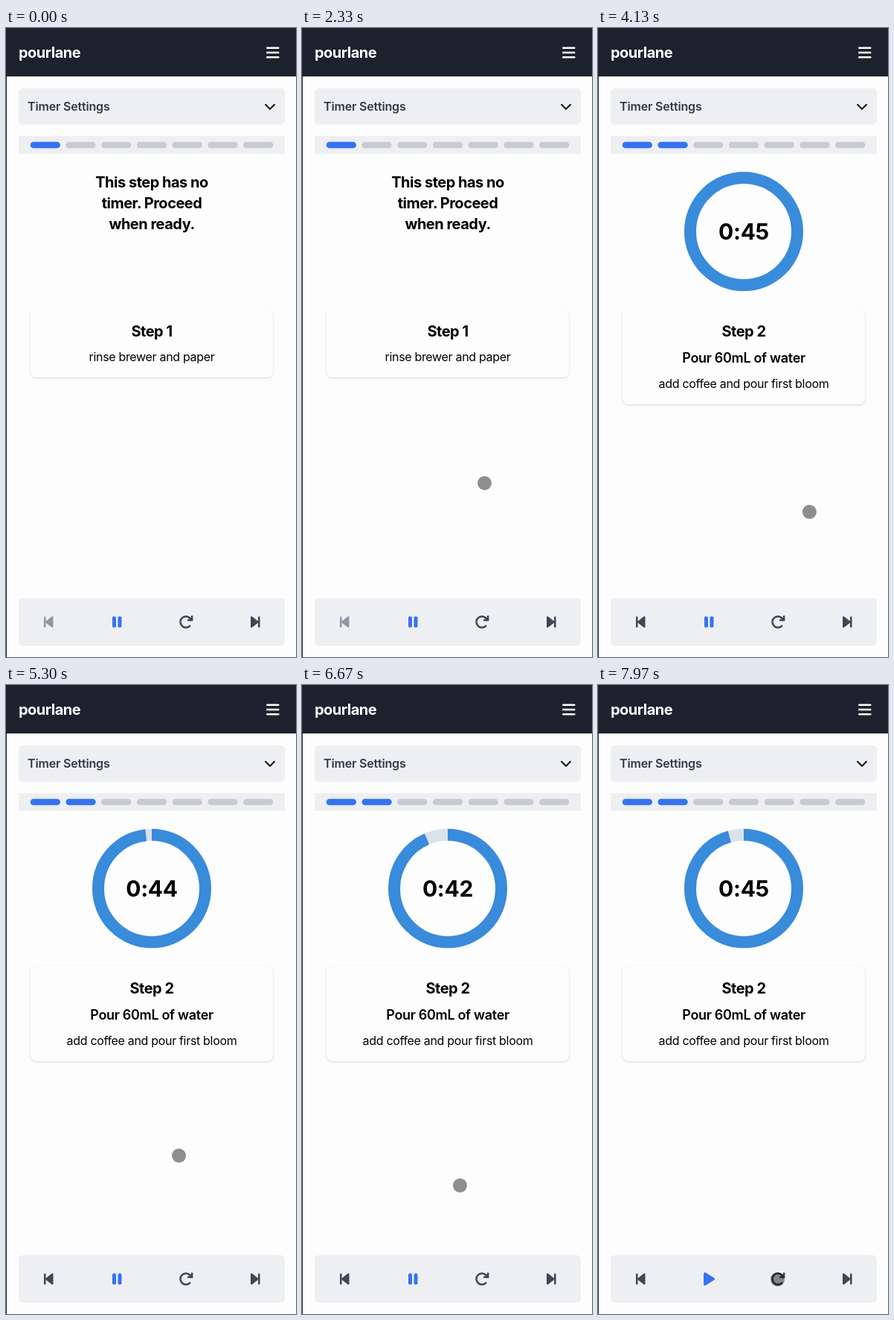
Recreate the animation shown at these times as an HTML page with a canvas. Size 390 by 844 pixels, loop 8000 ms.

```html
<!DOCTYPE html>
<html lang="en">
<head>
<meta charset="utf-8">
<title>Brew timer</title>
<style>
  html, body { margin: 0; width: 100%; height: 100%; overflow: hidden; background: #fdfdfd; }
  body { position: relative; font: 16px/24px Inter, "Open Sans", sans-serif; letter-spacing: -0.02em; color: #000; }
  canvas { position: absolute; left: 0; top: 0; width: 390px; height: 844px; }
  div { position: absolute; left: 33px; width: 326px; text-align: center; white-space: pre; }
  #brand, #settings { text-align: left; }
  #brand, #notice, #step { font: 700 20px/28px Inter, sans-serif; letter-spacing: -0.025em; }
  #brand { left: 17px; top: 19px; color: #fff; }
  #settings { left: 29px; top: 93px; font-weight: 600; letter-spacing: -0.01em; color: #333a46; }
  #notice { top: 193px; }
  #clock { top: 255px; font: 700 30px/36px Inter, sans-serif; }
  #step { top: 393px; }
  #pour { top: 429px; font: 600 18px/28px Inter, sans-serif; }
</style>
</head>
<body>
<canvas id="stage"></canvas>
<div id="brand">pourlane</div>
<div id="settings">Timer Settings</div>
<div id="notice">This step has no
timer. Proceed
when ready.</div>
<div id="clock"></div>
<div id="step"></div>
<div id="pour">Pour 60mL of water</div>
<div id="note"></div>
<script>
const LOOP = 8000, ENTER_AT = 1800, NEXT_AT = 3500, PAUSE_AT = 7020, RESET_AT = 7880;
const TOTAL = 45, FIRST_TICK = 5110, TICK = 2000 / 3, GLIDE = 400;
const PANEL = '#eeeff3', BLUE = '#3574f0', DARK = '#3f4654', MUTED = '#9197a1';
const ICON_Y = 797;

// Pointer stops: [time, x, y]
const STOPS = [
  [ENTER_AT, 374, 645], [2170, 260, 594], [2330, 245, 610], [3070, 337, 780],
  [NEXT_AT, 336, 794], [4130, 284, 649], [4270, 243, 620], [5300, 232, 631],
  [6670, 212, 671], [PAUSE_AT, 143, 801], [RESET_AT, 241, 797]
];

const $ = id => document.getElementById(id);
const canvas = $('stage'), ctx = canvas.getContext('2d');
const scale = window.devicePixelRatio || 1;
canvas.width = 390 * scale;
canvas.height = 844 * scale;

// CSS "ease": cubic-bezier(.25, .1, .25, 1)
function ease(x) {
  if (x <= 0) return 0;
  if (x >= 1) return 1;
  const bez = (a, b, u) => 3 * a * u * (1 - u) ** 2 + 3 * b * u * u * (1 - u) + u ** 3;
  let lo = 0, hi = 1;
  for (let i = 0; i < 20; i++) {
    const mid = (lo + hi) / 2;
    if (bez(0.25, 0.25, mid) < x) lo = mid; else hi = mid;
  }
  return bez(0.1, 1, lo);
}

// Shown seconds and the ring value that glides after them
function countdown(t) {
  const lastTick = Math.floor((PAUSE_AT - FIRST_TICK) / TICK) + 1;
  if (t >= RESET_AT) {
    return { shown: TOTAL, left: TOTAL - lastTick * (1 - ease((t - RESET_AT) / GLIDE)) };
  }
  const n = Math.min(lastTick, Math.max(0, Math.floor((t - FIRST_TICK) / TICK) + 1));
  const since = t - FIRST_TICK - (n - 1) * TICK;
  return { shown: TOTAL - n, left: n ? TOTAL - n + 1 - ease(since / GLIDE) : TOTAL };
}

function slope(i, k) {
  if (i <= 0 || i >= STOPS.length - 1) return 0;
  const rate = j => (STOPS[j + 1][k] - STOPS[j][k]) / (STOPS[j + 1][0] - STOPS[j][0]);
  const a = rate(i - 1), b = rate(i);
  return a * b > 0 ? 2 * a * b / (a + b) : 0;
}

// Monotone Hermite curve through the stops
function pointer(t) {
  let i = 0;
  while (i < STOPS.length - 2 && t >= STOPS[i + 1][0]) i++;
  const p = STOPS[i], q = STOPS[i + 1], h = q[0] - p[0], u = Math.min(1, (t - p[0]) / h);
  return [1, 2].map(k =>
    p[k] + (q[k] - p[k]) * u * u * (3 - 2 * u) +
    h * u * (1 - u) * (slope(i, k) * (1 - u) - slope(i + 1, k) * u));
}

function box(x, y, w, h, r, color) {
  ctx.fillStyle = color;
  ctx.beginPath();
  ctx.roundRect(x, y, w, h, r);
  ctx.fill();
}

function shadowBox(x, y, w, h, r, color, blur, alpha) {
  ctx.save();
  ctx.shadowColor = `rgba(0,0,0,${alpha})`;
  ctx.shadowBlur = blur * scale;
  ctx.shadowOffsetY = scale;
  box(x, y, w, h, r, color);
  ctx.restore();
}

function line(points, width, color) {
  ctx.strokeStyle = color;
  ctx.lineWidth = width;
  ctx.lineCap = ctx.lineJoin = 'round';
  ctx.beginPath();
  points.forEach(p => ctx.lineTo(...p));
  ctx.stroke();
}

// Filled triangle with rounded corners: base at x, tip at tipX
function triangle(x, tipX, half, soft, color) {
  const a = [x, ICON_Y - half], b = [x, ICON_Y + half], tip = [tipX, ICON_Y];
  line([a, b, tip, a, b], soft, color);
  ctx.fillStyle = color;
  ctx.fill();
}

function arc(x, y, r, from, to, width, color) {
  ctx.strokeStyle = color;
  ctx.lineWidth = width;
  ctx.beginPath();
  ctx.arc(x, y, r, from, to);
  ctx.stroke();
}

// Skip icon around x; dir is 1 for next, -1 for previous
function skip(x, dir, color) {
  const bar = x + dir * 5;
  triangle(x - dir * 5, x + dir * 3, 6.2, 2.5, color);
  line([[bar, ICON_Y - 6.25], [bar, ICON_Y + 6.25]], 2.5, color);
}

function reload(x, y) {
  const r = 7.5, d = r * Math.SQRT1_2;
  ctx.lineCap = 'round';
  arc(x, y, r, Math.PI / 4, Math.PI * 7 / 4, 2.5, DARK);
  line([[x + d, y - d], [x + 8.1, y - 2.5]], 2.5, DARK);
  line([[x + 3.1, y - 2.5], [x + 8.1, y - 2.5], [x + 8.1, y - 7.5]], 2.5, DARK);
}

function header() {
  box(0, 0, 390, 65, 0, '#1c232e');
  box(0, 65, 1, 779, 0, '#1c232e');
  for (let i = -1; i <= 1; i++) {
    const y = 33 + i * 6.25;
    line([[351.25, y], [366.25, y]], 2.5, '#fff');
  }
}

function settings() {
  shadowBox(17, 81, 358, 48, 6, PANEL, 2, 0.05);
  line([[349, 102.7], [355, 108.7], [361, 102.7]], 2, '#111');
}

function progress(done) {
  const count = 7, gap = 8, w = (326 + gap) / count - gap;
  box(17, 145, 358, 24, 0, PANEL);
  for (let i = 0; i < count; i++) {
    box(32.7 + i * (w + gap), 152.7, w + 0.6, 8.6, 4.3, i < done ? BLUE : '#c9cbd2');
  }
}

function ring(part) {
  const top = -Math.PI / 2, turn = Math.PI * 2;
  ctx.lineCap = 'butt';
  arc(196, 273, 72, 0, turn, 16, '#dce2eb');
  arc(196, 273, 72, top, top + turn * part, 16, '#398bdb');
}

function controls(second, paused) {
  box(17, 765, 358, 64, 6, PANEL);
  skip(57.25, -1, second ? DARK : MUTED);
  if (paused) {
    triangle(143.9, 155.1, 6.9, 3.75, BLUE);
  } else {
    for (const x of [143, 150.5]) box(x, ICON_Y - 7.5, 5, 15, 1.9, BLUE);
  }
  reload(242, ICON_Y);
  skip(335.25, 1, DARK);
}

function put(id, text) {
  const el = $(id);
  if (el.textContent !== text) el.textContent = text;
}

function labels(second, shown) {
  $('notice').style.display = second ? 'none' : '';
  $('clock').style.display = $('pour').style.display = second ? '' : 'none';
  put('clock', '0:' + shown);
  put('step', second ? 'Step 2' : 'Step 1');
  put('note', second ? 'add coffee and pour first bloom' : 'rinse brewer and paper');
  $('note').style.top = second ? '465px' : '429px';
}

function draw(t) {
  const second = t >= NEXT_AT;
  const { shown, left } = countdown(t);

  ctx.setTransform(scale, 0, 0, scale, 0, 0);
  box(0, 0, 390, 844, 0, '#fdfdfd');
  header();
  settings();
  progress(second ? 2 : 1);
  if (second) ring(left / TOTAL);
  shadowBox(33, 377, 326, second ? 128 : 92, 8, '#fdfdfd', 3, 0.16);
  controls(second, t >= PAUSE_AT);
  labels(second, shown);

  if (t >= ENTER_AT) {
    const [x, y] = pointer(t);
    ctx.fillStyle = 'rgba(0,0,0,.44)';
    ctx.beginPath();
    ctx.arc(x + 0.5, y + 0.5, 9.5, 0, Math.PI * 2);
    ctx.fill();
  }
}

const start = performance.now();
function tick() {
  draw((performance.now() - start) % LOOP);
  requestAnimationFrame(tick);
}
tick();
</script>
</body>
</html>
```
